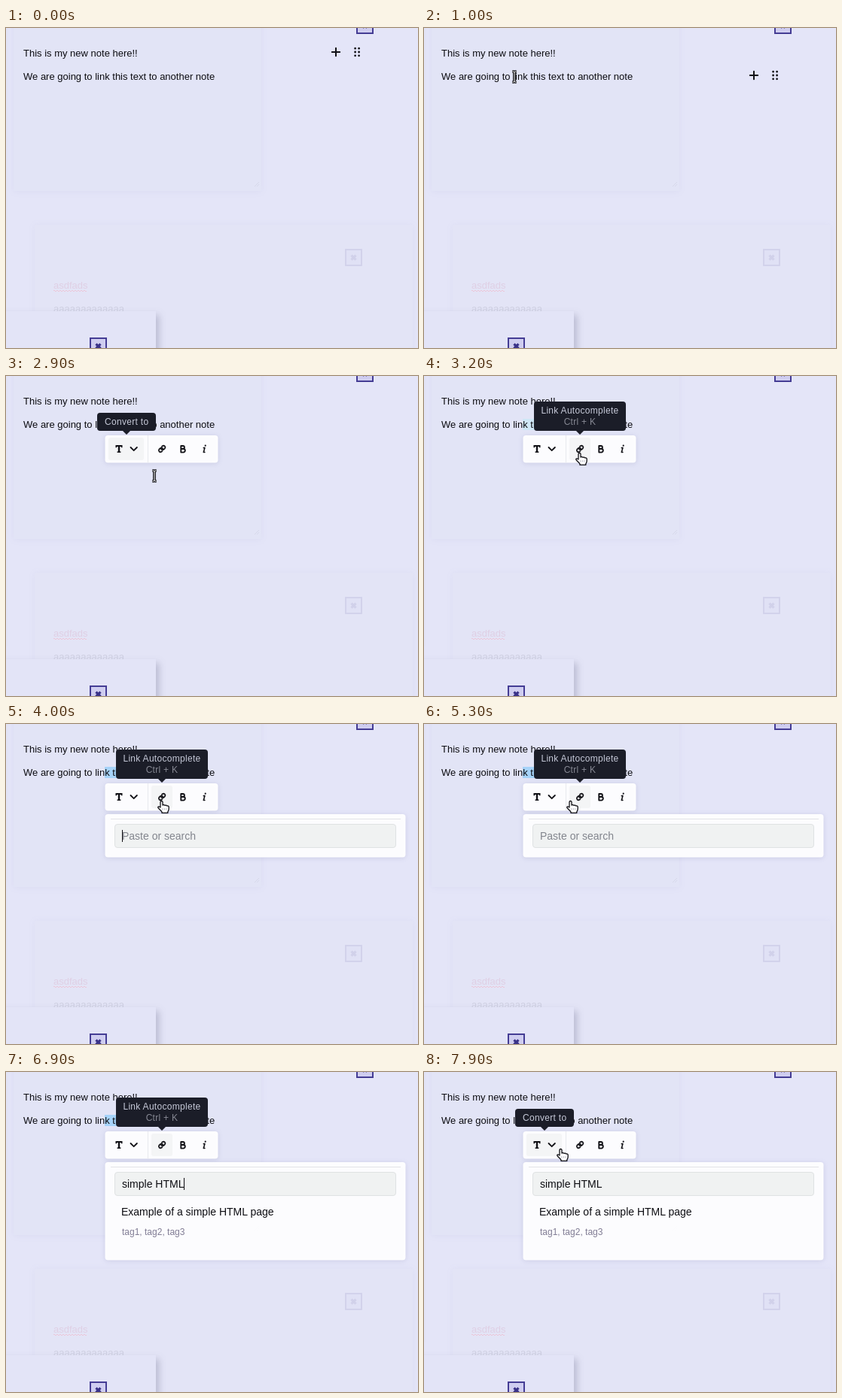
An HTML page for the animation above (8 s loop, 547 by 426 pixels).

```html
<!DOCTYPE html>
<html lang="en">
<head>
<meta charset="utf-8">
<title>Linking notes</title>
<style>
  html, body { margin: 0; width: 100%; height: 100%; overflow: hidden; background: #e4e5f8; }
  svg { display: block; }
  text { font: 13px "Liberation Sans", Arial, sans-serif; white-space: pre; fill: #0d0d12; }
  .field { font-size: 14px; }
  .tip text { font-size: 12px; letter-spacing: .3px; text-anchor: middle; fill: #c6c9d8; }
  .tip .key { fill: #868893; }
  .tip path { fill: #1b1d28; }
  .panel { fill: #fff; fill-opacity: .94; filter: drop-shadow(0 1px 3px rgba(70, 70, 130, .16)); }
  .hover { fill: #f4f5f6; }
  .line { fill: none; stroke: #111116; stroke-linecap: round; stroke-linejoin: round; }
</style>
</head>
<body>
<svg width="547" height="426" viewBox="0 0 547 426">
  <defs>
    <g id="close">
      <rect x="1" y="1" width="21" height="21" fill="#cfcdf0" stroke="#443c94" stroke-width="2"/>
      <path d="M8.5 8.7l6 6m0-6l-6 6" stroke="#3a3288" stroke-width="3.2"/>
    </g>
  </defs>

  <!-- Notes -->
  <rect width="547" height="426" fill="#e4e5f8"/>
  <rect x="-10" y="-10" width="13" height="370" fill="#e3e4f6"/>
  <rect x="10" y="-10" width="329" height="227" fill="#e2e4f6" style="filter:drop-shadow(0 1px 4px rgba(90,90,150,.06))"/>
  <path d="M330 211l6-6m-3 6l3-3" stroke="#d3d5e6" stroke-width=".8"/>
  <rect x="38" y="262" width="502" height="190" fill="#e3e4f6" style="filter:drop-shadow(0 0 4px rgba(90,90,150,.05))"/>
  <use href="#close" x="465" y="-15"/>
  <use href="#close" x="450" y="294" opacity=".1"/>
  <text x="63" y="347" style="fill:#dfcfe4">asdfads</text>
  <path id="squiggle" fill="none" stroke="#ecc6d8"/>
  <text x="63" y="378" style="fill:#cfd0e2">aaaaaaaaaaaaa</text>
  <rect x="-20" y="377" width="219" height="90" fill="#e3e4f7" style="filter:drop-shadow(4px 5px 5px rgba(60,60,100,.25))"/>
  <use href="#close" x="111" y="412"/>

  <rect id="mark" x="131" y="57" height="15"/>
  <text x="23" y="38">This is my new note here!!</text>
  <text id="sentence" x="23" y="69">We are going to link this text to another note</text>

  <g id="handle">
    <path class="line" d="M432.8 0h10.4M438-5.2v10.4" stroke-width="2"/>
    <path class="line" d="M463.6-4.8h0m5 0h0M463.6 0h0m5 0h0M463.6 4.8h0m5 0h0" stroke-width="2.8"/>
  </g>

  <!-- Formatting bar -->
  <g id="bar">
    <rect class="panel" x="131.5" y="79" width="150" height="36.5" rx="4"/>
    <rect id="hoverT" class="hover" x="136" y="82" width="47" height="30" rx="3"/>
    <rect id="hoverLink" class="hover" x="193" y="82" width="28" height="30" rx="3"/>
    <path d="M188.5 79v36.5" stroke="#e8e9ee"/>
    <path d="M145.5 92h9v3.2h-1.7v-1.3h-1.6v6.5h1.2v1.7h-4.8v-1.7h1.2v-6.5h-1.6v1.3h-1.7z" fill="#111116"/>
    <path class="line" d="M165.5 95l4.2 4.2 4.2-4.2" stroke-width="1.8"/>
    <path class="line" transform="translate(201.7 91.6) scale(.45)" stroke-width="4" d="M10 13a5 5 0 0 0 7.5.5l3-3a5 5 0 0 0-7-7l-1.8 1.7M14 11a5 5 0 0 0-7.5-.5l-3 3a5 5 0 0 0 7 7l1.8-1.7"/>
    <path class="line" d="M232.3 93h2.6a2 2 0 0 1 0 4h-2.6zm0 4h3.2a2.3 2.3 0 0 1 0 4.6h-3.2z" stroke-width="1.9"/>
    <path class="line" d="M262.3 95.6h1.6l-1.6 5.9h1.6" stroke-width="1.6"/>
    <circle cx="264.7" cy="92.7" r="1.1" fill="#111116"/>
  </g>

  <!-- Link search -->
  <g id="search">
    <rect id="box" class="panel" x="131.5" y="120" width="399" rx="4"/>
    <path d="M139 126.5h385" stroke="#e3e4e8"/>
    <rect x="144.5" y="133.5" width="373" height="31" rx="3.5" fill="#f0f2f2" stroke="#dfe2e3"/>
    <text id="query" class="field" x="154" y="154"></text>
    <rect id="caret" y="141" width="1" height="16" fill="#0d0d12"/>
    <g id="result">
      <text class="field" x="153" y="191">Example of a simple HTML page</text>
      <text x="154" y="217" style="font-size:12px;fill:#807c94">tag1, tag2, tag3</text>
    </g>
  </g>

  <g id="tipT" class="tip">
    <path d="M125 49h70q4 0 4 4v16q0 4-4 4h-30l-5 5-5-5h-30q-4 0-4-4v-16q0-4 4-4z"/>
    <text x="160.2" y="65">Convert to</text>
  </g>
  <g id="tipLink" class="tip">
    <path d="M150 34h114q4 0 4 4v31q0 4-4 4h-52l-5 5-5-5h-52q-4 0-4-4v-31q0-4 4-4z"/>
    <text x="207" y="50">Link Autocomplete</text>
    <text x="207" y="65" class="key">Ctrl + K</text>
  </g>

  <!-- Pointers -->
  <g id="beam" fill="none">
    <path id="beamShape" d="M-2.6-7h1.2q1.4 0 1.4 1.4V5.6Q0 7-1.4 7h-1.2M2.6-7h-1.2Q0-7 0-5.6M0 5.6Q0 7 1.4 7h1.2" stroke="#0d0d12" stroke-width="3.2"/>
    <use href="#beamShape"/>
    <path d="M-2.6-7h1.2q1.4 0 1.4 1.4V5.6Q0 7-1.4 7h-1.2M2.6-7h-1.2Q0-7 0-5.6M0 5.6Q0 7 1.4 7h1.2" stroke="#fff"/>
  </g>
  <g id="hand">
    <path d="M4 9V2a1.5 1.5 0 0 1 3 0v4c.6-.8 2.5-.6 3 .4.8-.6 2.2-.3 2.6.6 1-.4 2.6.1 2.6 1.6V11c0 2-.9 2.8-1.4 4v1.4H6V15C4.6 13 2.6 11.800 1 9.700.2 8.300 1.800 7.400 2.800 8.200z" fill="#fff" stroke="#0d0d12" stroke-width="1.3" stroke-linejoin="round"/>
    <path d="M6.800 10.300v2m2.500-2v2m2.500-2v2" stroke="#9a9aa4" stroke-width=".8"/>
  </g>
</svg>
<script>
const el = Object.fromEntries([...document.querySelectorAll('[id]')].map(e => [e.id, e]));
const show = (e, on) => e.style.display = on ? '' : 'none';
const place = (e, x, y) => e.setAttribute('transform', `translate(${x} ${y})`);
const within = (t, a, b) => t >= a && t < b;

// Pointer runs: start, end, kind, from x, y, to x, y; it rests after each run
const runs = [
  [0, 0, ''],
  [300, 400, 'beam', 130, 46, 139, 58],
  [600, 1000, 'beam', 136, 60, 120, 65],
  [1500, 1600, 'beam', 124, 65, 131, 65],
  [1700, 2300, 'beam', 138, 65, 194.5, 65],
  [2700, 2700, 'beam', 192, 78, 192, 78],
  [2800, 2800, 'hand', 172, 100, 172, 100],
  [2900, 3000, 'beam', 197, 133, 204, 127],
  [3100, 3200, 'hand', 200, 104, 201, 102],
  [4400, 4400, 'hand', 189, 102, 189, 102],
  [5400, 5400, ''],
  [7600, 7700, 'hand', 166, 106, 170, 103],
  [7900, 7900, 'hand', 176, 102, 176, 102],
];

// Number of typed characters from each moment on
const keys = [[5400, 1], [5500, 2], [5600, 3], [5900, 4], [6000, 6], [6100, 7],
  [6400, 8], [6500, 9], [6600, 10], [6700, 11]];

const phrase = 'simple HTML';
const firstMarked = el.sentence.textContent.indexOf('k');

let wave = 'M63 350';
for (let i = 0; i < 11; i++) wave += 'q1-2 2 0t2 0';
el.squiggle.setAttribute('d', wave);

function pointer(t) {
  const [a, b, kind, x0, y0, x1, y1] = runs.findLast(r => r[0] <= t);
  const p = b > a ? Math.min(1, (t - a) / (b - a)) : 1;
  const x = x0 + (x1 - x0) * p, y = y0 + (y1 - y0) * p;
  for (const name of ['beam', 'hand']) {
    show(el[name], kind === name);
    if (kind === name) place(el[name], x, y);
  }
  return x;
}

function markEnd(x) {
  let end = 131;
  for (let i = firstMarked; i < firstMarked + 13; i++) {
    const stop = el.sentence.getEndPositionOfChar(i).x;
    if (stop <= x + 2) end = stop;
  }
  return end;
}

function draw(now) {
  const t = Math.floor(now % 8000 / 100) * 100;
  const x = pointer(t);

  show(el.handle, t < 2400);
  place(el.handle, 0, t < 300 ? 32 : 63);

  show(el.mark, t >= 1700);
  el.mark.setAttribute('width', markEnd(t < 2300 ? x : 194.5) - 131);
  el.mark.setAttribute('fill', t < 4000 ? '#cfe7f6' : '#a6d3f9');

  const onT = within(t, 2800, 3100) || t >= 7600;
  const onLink = within(t, 3100, 7600);
  show(el.bar, t >= 2400);
  show(el.hoverT, onT);
  show(el.tipT, onT);
  show(el.hoverLink, onLink);
  show(el.tipLink, onLink);

  const found = t >= 6900;
  show(el.search, t >= 4000);
  show(el.result, found);
  el.box.setAttribute('height', found ? 130.5 : 57.5);

  const typed = (keys.findLast(k => k[0] <= t) || [0, 0])[1];
  el.query.textContent = typed ? phrase.slice(0, typed) : 'Paste or search';
  el.query.style.fill = typed ? '#0d0d12' : '#82858d';
  const end = typed && t >= 4000 ? el.query.getEndPositionOfChar(typed - 1).x : 154;
  el.caret.setAttribute('x', Math.floor(end));
  show(el.caret, t !== 5300 && t < 7900);

  requestAnimationFrame(() => draw(performance.now()));
}
draw(0);
</script>
</body>
</html>
```
